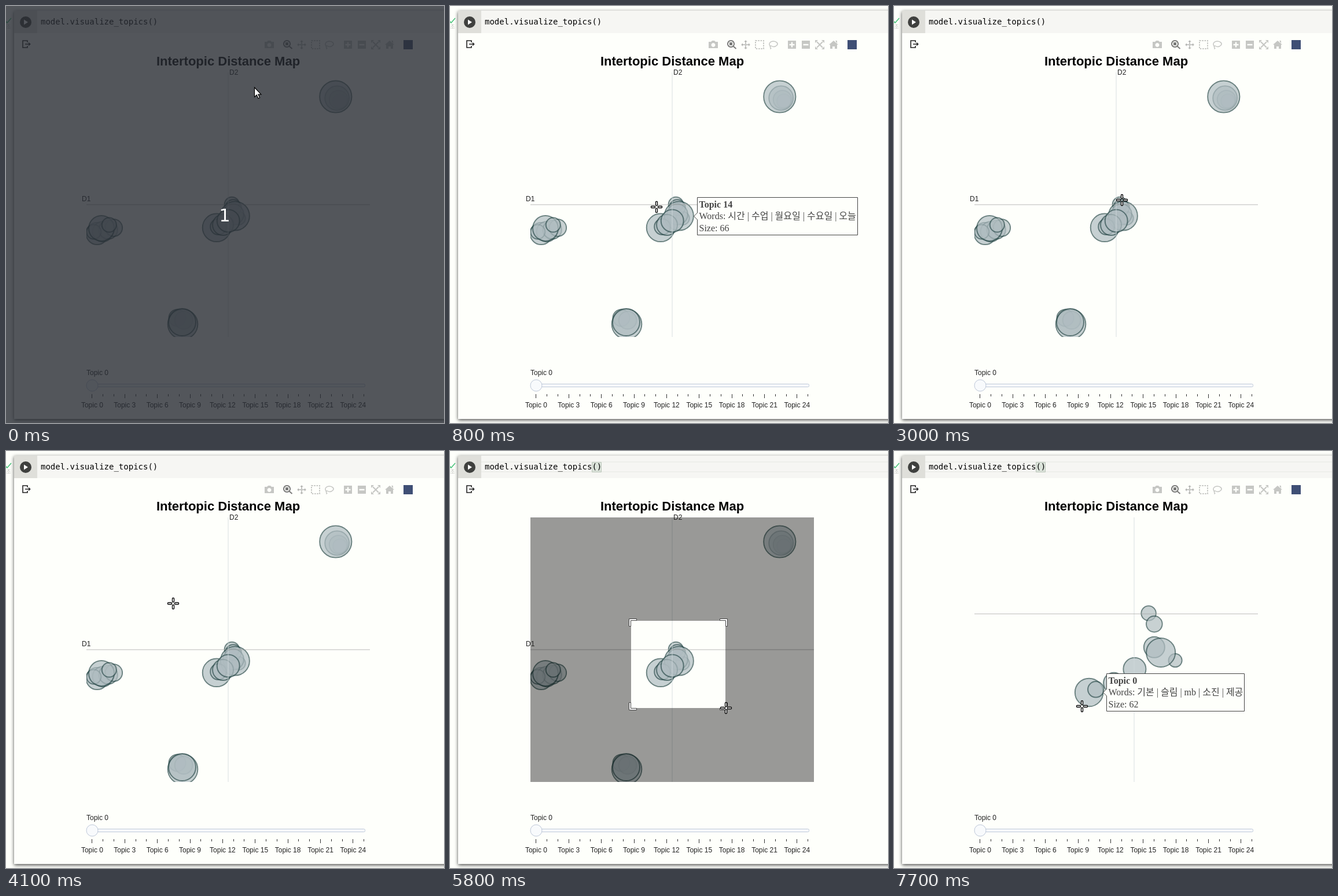
These frames come from a looping animation (757 px wide and 722 px high, 8000 ms). An HTML page with a canvas:

```html
<!DOCTYPE html>
<html lang="en">
<head>
<meta charset="utf-8">
<title>Topic map</title>
<style>
html, body { margin: 0; width: 100%; height: 100%; overflow: hidden; background: #fefffb; }
canvas { display: block; }
</style>
</head>
<body>
<canvas id="stage" width="757" height="722"></canvas>
<script>
const c = document.getElementById('stage').getContext('2d');
const LOOP = 8000, BG = '#fefffb', INK = '#444';
const SANS = '"Liberation Sans", Arial, sans-serif';
const SERIF = '"Liberation Serif", "Noto Sans CJK KR", "Noto Sans CJK", serif';
const PLOT = [139, 115, 490, 458];
const FOCUS_AT = 5050, DRAG_AT = 5233, ZOOM_AT = 6300;
const SEL = { x: 313.2, y: 294.7, sx: 3.9, sy: 3.4 };

const clamp = v => Math.max(0, Math.min(1, v));
const ease = v => { const k = clamp(v); return k * k * (3 - 2 * k); };

// A row of bubbles around (x, y); radii scale with distance from index 0
const fan = (x, y, r, dx, dy, scale, from, to) =>
  Array.from({ length: to - from + 1 }, (_, i) => {
    const k = from + i;
    return { x: x + dx * k, y: y + dy * k, r: r * scale ** Math.abs(k) };
  });

const topic = (x, y, size, id, words) => ({ x, y, size, r: 3.08 * Math.sqrt(size), id, words });

const bubbles = [
  ...fan(577, 164.5, 12, -2.4, -2.5, 1.32, 0, 3),
  ...fan(296, 540, 14.5, 11, 4, 1.06, 0, 1),
  ...fan(305.5, 551, 25.8, -1, -3.5, 0.91, 0, 1),
  ...fan(157.5, 394, 19, 9.6, -3.3, 0.92, 0, 3),
  ...fan(165, 385, 22, 13.3, -6, 0.57, -1, 1),
  topic(364, 383.8, 62, 0, '기본 슬림 mb 소진 제공'),
  topic(402.2, 367.5, 14, 4, '동파 보일러 수도 떨어지 똑똑똑'),
  topic(390.4, 343.5, 17, 9, '확인 문의 요금 신청 변경'),
  topic(392.9, 349, 20),
  topic(392.9, 360.8, 34),
  topic(395.8, 363.5, 66, 14, '시간 수업 월요일 수요일 오늘'),
  topic(367, 382.3, 20),
  topic(375, 379, 34),
  topic(384.2, 371.9, 40, 17, '주문 배송 택배 도착 토요일')
];

// from, to, topic
const hovers = [
  [500, 1000, 14], [1000, 1100, 0], [1900, 2100, 0], [2100, 2200, 4],
  [2200, 2800, 14], [2800, 3000, 9], [6500, 6900, 17], [7100, LOOP, 0]
];

// start, end, destination
const moves = [
  [100, 800, 357, 348], [1450, 1600, 339, 397], [1850, 2100, 401, 378],
  [2150, 2800, 395, 338], [2950, 3500, 363, 243], [3800, 4160, 283, 266],
  [4450, 5050, 313, 294], [5050, 5800, 477, 445], [5800, 6200, 439, 429],
  [6250, 6700, 420, 405], [6800, 7500, 325, 442]
];

const pointer = t => moves.reduce(([x, y], [from, to, tx, ty]) => {
  const k = ease((t - from) / (to - from));
  return [x + (tx - x) * k, y + (ty - y) * k];
}, [430, 150]).map(Math.round);

// outline, filled part
const icons = {
  camera: ['', 'M-8-5h4l2-2h4l2 2h4v11h-16zM0-3a3.5 3.5 0 1 0 .01 0z'],
  zoom: ['M-1.5-7a5.5 5.5 0 1 0 .01 0zM3 3l4.5 4', 'M-4-4h5v5h-5z'],
  pan: ['M-6 0h12M0-6v12', 'M-8 0l3-3v6zM8 0l-3-3v6zM0-8l-3 3h6zM0 8l-3-3h6z'],
  select: ['M-7-7h14v14h-14z', ''],
  lasso: ['M-5 3c-5-5 0-9 5-9s9 4 6 7-7 3-10 1q-3 1-1 3t-1 2', ''],
  plus: ['', 'M-7-7h14v14h-14zM-1.2-4.5v3.3h-3.3v2.4h3.3v3.3h2.4v-3.3h3.3v-2.4h-3.3v-3.3z'],
  minus: ['', 'M-7-7h14v14h-14zM-4.5-1.2v2.4h9v-2.4z'],
  fit: ['M-5-5l10 10M5-5l-10 10', 'M-8-8h5l-5 5zM8-8v5l-5-5zM-8 8v-5l5 5zM8 8h-5l5-5z'],
  home: ['', 'M0-7l8 7h-2v7h-4v-4h-4v4h-4v-7h-2zM3-7h3v5z']
};

function place(x, y, t) {
  return t < ZOOM_AT ? [x, y]
    : [PLOT[0] + (x - SEL.x) * SEL.sx, PLOT[1] + (y - SEL.y) * SEL.sy];
}

function rect(color, x, y, w, h) {
  c.fillStyle = color;
  c.fillRect(x, y, w, h);
}

function text(str, x, y, font, color = '#222', align = 'left') {
  c.font = font;
  c.fillStyle = color;
  c.textAlign = align;
  c.fillText(str, x, y);
}

function shape(d, fill, stroke, width = 1) {
  const p = new Path2D(d);
  if (fill) { c.fillStyle = fill; c.fill(p, 'evenodd'); }
  if (stroke) { c.strokeStyle = stroke; c.lineWidth = width; c.stroke(p); }
}

function disc(x, y, r, fill, stroke, width) {
  const p = new Path2D();
  p.arc(x, y, r, 0, 7);
  shape(p, fill, stroke, width);
}

function pill(x, y, w, h, r, fill, stroke, width) {
  const p = new Path2D();
  p.roundRect(x, y, w, h, r);
  shape(p, fill, stroke, width);
}

function drawCell(t) {
  rect(BG, 0, 0, 757, 722);
  c.save();
  c.shadowColor = 'rgba(0,0,0,.7)';
  c.shadowBlur = 6;
  c.shadowOffsetY = 1.5;
  rect(BG, 14, 8, 760, 707);
  c.restore();
  rect('#f6f6f3', 54, 8, 703, 39);
  rect('#dfdfda', 14, 8, 40, 39);
  shape('M-2 25l4 4 7-8', null, '#4dc47d', 1.6);
  text('보초', -8, 39, '9px "Noto Sans CJK KR", sans-serif', '#c4c5c1');
  disc(34, 28, 10, '#3f403e');
  shape('M31 23.5v9l7-4.5z', '#fff');
  if (t >= FOCUS_AT) {
    rect('#eeefeb', 54, 18, 703, 2);
    rect('#eeefeb', 54, 35, 703, 2);
    shape('M245.5 19.5h16v17h-16z', '#dbe3da', '#bcc6bb');
    if (Math.floor((t - FOCUS_AT) / 530) % 2 === 0) rect('#000', 261, 18, 2, 19);
  }
  text('model.visualize_topics()', 60, 32, '14px "DejaVu Sans Mono", monospace', '#000');
  shape('M37 63v-3h-8v12h8v-3', null, '#222', 1.6);
  shape('M33 66h8M39 63.5l2.7 2.5-2.7 2.5', null, '#222', 1.4);
}

function drawModebar(t) {
  const shown = t < ZOOM_AT ? 1 - clamp((t - DRAG_AT) / 200) : clamp((t - ZOOM_AT + 100) / 300);
  const gapAfter = ['camera', 'lasso'];
  let x = 455;
  for (const [name, [line, solid]] of Object.entries(icons)) {
    c.save();
    c.translate(x, 67);
    c.globalAlpha = shown * (name === 'zoom' ? 0.7 : 0.3);
    if (name === 'select') c.setLineDash([2.5, 1.8]);
    shape(line, null, INK, name === 'lasso' ? 1.5 : 2);
    shape(solid, INK);
    c.restore();
    x += gapAfter.includes(name) ? 32 : 24;
  }
  c.globalAlpha = shown;
  rect('#3f4f75', 687, 59, 16, 16);
  c.globalAlpha = 1;
}

function drawPlot(t) {
  c.save();
  c.beginPath();
  c.rect(...PLOT);
  c.clip();
  c.globalAlpha = 0.7;
  for (const b of bubbles) {
    const [x, y] = place(b.x, b.y, t);
    disc(x, y, b.r - 1, '#b0bdc1');
    disc(x, y, b.r, null, '#2f4f4f', 2);
  }
  c.globalAlpha = 1;
  const [ax, ay] = place(384, 343.9, t).map(Math.round);
  rect('rgba(207,216,220,.42)', ax - 1, 115, 2, 458);
  rect('rgba(158,158,158,.36)', 139, ay - 1, 490, 2);
  c.restore();
  if (t >= DRAG_AT && t < ZOOM_AT) drawSelection(t);
  text('Intertopic Distance Map', 384, 103, 'bold 22px ' + SANS, '#000', 'center');
  if (t < ZOOM_AT) {
    text('D1', 131, 338, '12px ' + SANS);
    text('D2', 386, 119, '12px ' + SANS);
  }
}

function drawSelection(t) {
  // the box runs slightly ahead of the drawn pointer
  const l = 313, top = 294, [r, b] = pointer(t + 40);
  const shown = clamp((t - DRAG_AT) / 200), p = new Path2D();
  p.rect(...PLOT);
  p.rect(l, top, r - l, b - top);
  shape(p, `rgba(0,0,0,${0.4 * shown})`);
  c.globalAlpha = shown;
  for (const [x, dx] of [[l, 1], [r, -1]])
    for (const [y, dy] of [[top, 1], [b, -1]])
      shape(`M${x - 3.5 * dx},${y + 9.5 * dy}h${3 * dx}v${-10 * dy}h${10 * dx}v${-3 * dy}h${-13 * dx}z`, '#fff', INK);
  c.globalAlpha = 1;
}

function drawSlider() {
  text('Topic 0', 139, 639, '12px ' + SANS);
  pill(144.5, 654.5, 476, 5, 2, '#f8fafc', '#bec8d9');
  disc(149, 657, 10, '#f8fafc', '#bec8d9');
  for (let i = 0; i < 26; i++) {
    const x = 148.9 + i * 18.79, major = i % 3 === 0;
    rect('#333', Math.floor(x), 672, 1, major ? 7 : 4);
    if (major && i < 25) text('Topic ' + i, x, 695, '12px ' + SANS, '#222', 'center');
  }
}

function drawTooltip(t) {
  const hover = hovers.find(([from, to]) => t >= from && t < to);
  if (!hover) return;
  const b = bubbles.find(b => b.id === hover[2]);
  const [x, cy] = place(b.x, b.y, t), y = Math.round(cy);
  const line = 'Words: ' + b.words.split(' ').join(' | ');
  c.font = '16px ' + SERIF;
  const w = Math.round(c.measureText(line).width + 5.6);
  const dir = x + b.r + w > 705 ? -1 : 1;
  const tip = Math.round(x + dir * (b.r + 1)) - 0.5 * dir, edge = tip + 6 * dir;
  shape(`M${tip},${y}l${6 * dir},-6v-26.5h${w * dir}v65h${-w * dir}v-26.5z`, BG, INK);
  const tx = Math.min(edge, edge + w * dir) + 3;
  text('Topic ' + b.id, tx, y - 15, 'bold 16px ' + SERIF, INK);
  text(line, tx, y + 5, '16px ' + SERIF, INK);
  text('Size: ' + b.size, tx, y + 26, '16px ' + SERIF, INK);
}

function drawCross(t) {
  c.save();
  c.translate(...pointer(t));
  for (let i = 0; i < 4; i++) {
    pill(2.5, -1.5, 7, 3, 1, '#fff', '#000', 1.3);
    c.rotate(Math.PI / 2);
  }
  c.restore();
}

function drawCountdown() {
  rect('rgba(40,44,52,.8)', 0, 0, 757, 722);
  text('1', 378, 373, '30px "DejaVu Sans", sans-serif', '#fff', 'center');
  shape('M429.5 141v16.5l3.8-3.5 2.6 6 2.6-1.2-2.6-5.6h5z', '#fff', '#000', 1.2);
}

function frame() {
  const t = Math.floor(performance.now() % LOOP / 100) * 100;
  drawCell(t);
  drawModebar(t);
  drawPlot(t);
  drawSlider();
  drawTooltip(t);
  if (t < 100) drawCountdown();
  else drawCross(t);
  requestAnimationFrame(frame);
}
frame();
</script>
</body>
</html>
```
